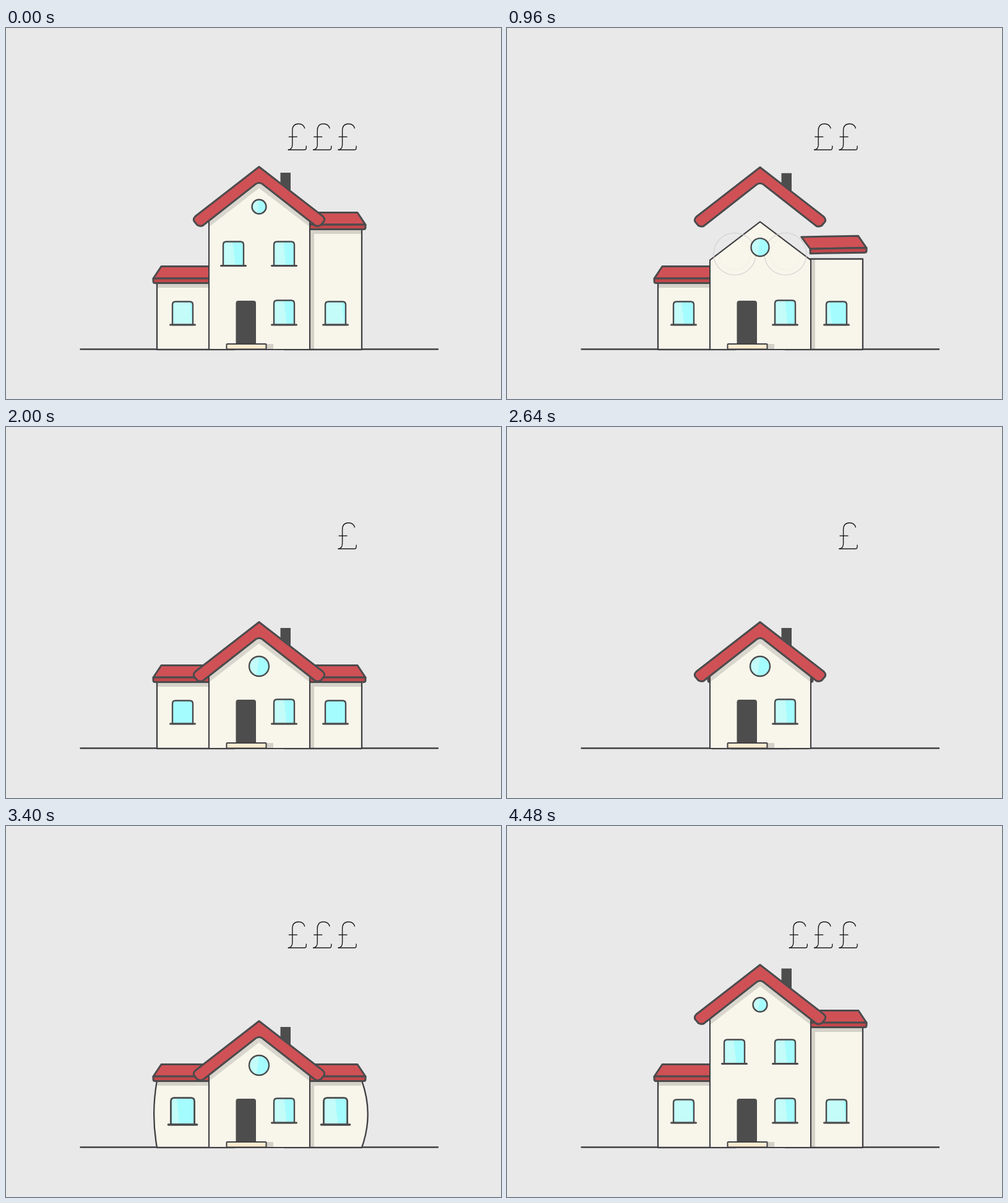
An HTML page that plays this animation: 800 by 600 pixels, repeating every 4.56 s.

```html
<!DOCTYPE html>
<html lang="en">
<head>
<meta charset="utf-8">
<title>House resizing</title>
<style>
  html, body { margin: 0; width: 100%; height: 100%; overflow: hidden; background: #e9e9e9; }
  svg { display: block; width: 800px; height: 600px; stroke-linejoin: round; }
</style>
</head>
<body>
<svg id="stage" viewBox="0 0 800 600"></svg>
<script>
const LOOP = 4560, STEP = 40;
const INK = '#4b4b4d', LINE = '#3f3f43', WALL = '#f8f6eb', SHADE = '#d3d1c8';
const RED = '#cf5155', DARK_RED = '#c2474b', GLASS = '#a5fcff', SHINE = '#c3fcf8';
const stage = document.getElementById('stage');

const clamp = (v, lo, hi) => Math.max(lo, Math.min(hi, v));
const part = (t, start, span) => clamp((t - start) / span, 0, 1);
const smooth = u => u * u * (3 - 2 * u);
// Pulls back by the amount s before it leaves.
const backIn = (u, s) => u * u * ((s + 1) * u - s);

// Window standing on its sill at (x, y); edge is where the shine ends.
function pane(x, y, h, edge, scale = 1) {
  if (scale <= 0) return '';
  const frame = `M-16.5 0V${5 - h}q0-5 5-5H11.5q5 0 5 5V0Z`;
  const a = clamp(edge - 2, -15, 15), b = clamp(edge + 2, -15, 15);
  return `<g transform="translate(${x} ${y - h / 2}) scale(${scale}) translate(0 ${h / 2})">
    <path d="${frame}" fill="${GLASS}"/>
    <path d="M-15 0V${5 - h}q0-4 4-4H${a}L${b} 0Z" fill="${SHINE}" opacity="${edge > -13 ? 1 : 0}"/>
    <path d="${frame}" fill="none" stroke="${INK}" stroke-width="2.4"/>
    <path d="M-20 0H20" stroke="${INK}" stroke-width="3" stroke-linecap="round"/></g>`;
}

// Left-hand wing; the right one is its mirror image.
function wing(slide, wallY, roofY, tilt, bulge, side) {
  const top = 412 + wallY, more = Math.max(0, -slide);
  const shade = Math.max(0, 8 - wallY + roofY);
  const outline = `M370 520H244Q${244 - bulge} ${(top + 520) / 2} 244 ${top}H370`;
  return `<g transform="translate(${slide} 0)">
    <path d="${outline}" fill="${WALL}"/>
    <path d="M245 ${top}H370v${shade}H245Z${side ? `M321 ${top + shade}H370V519H321Z` : ''}" fill="${SHADE}"/>
    <path d="${outline}" fill="none" stroke="${LINE}" stroke-width="2.3"/>
    <g transform="translate(0 ${roofY}) rotate(${tilt} 290 405)" stroke="${INK}" stroke-width="3">
      <path d="M251 385.5H${343 + more}L${329 + more} 405H238Z" fill="${RED}"/>
      <path d="M238 405H${329 + more}V412.5H241q-3 0-3-3Z" fill="${DARK_RED}"/>
    </g></g>`;
}

function pound(x, drawn) {
  if (drawn <= 0) return '';
  const strokes = ['M28 162q-2-7.5-10-7.5q-10 0-10 11V188q0 8-7 8.5', 'M2 175.5H16', 'M1 196.5H28q3 0 2.5-6.5'];
  return `<g transform="translate(${x} .5)" fill="none" stroke="#1c1c1c" stroke-width="1.4">` +
    strokes.map(d => `<path pathLength="1" stroke-dasharray="${drawn} 2" d="${d}"/>`).join('') + '</g>';
}

// Burst left behind by a vanishing window.
function ring(x, u) {
  if (u <= 0 || u >= 1) return '';
  const r = 42 * (1 - (1 - u) ** 2.4);
  return `<g fill="none" stroke="#cfcfcf" opacity="${1 - u * u}">
    <circle cx="${x}" cy="365.5" r="${r}" stroke-width="1.5"/>
    <circle cx="${x}" cy="365.5" r="${r * .75}" stroke-width=".5" opacity=".5"/></g>`;
}

function draw(t) {
  // 0 at rest, 1 between the trip out and the trip back.
  const away = (out, outSpan, back, backSpan) =>
    smooth(part(t, out, outSpan)) - smooth(part(t, back, backSpan));
  const hop = (start, span, height) => height * Math.sin(Math.PI * part(t, start, span));
  const shine = time => 20 * Math.cos(2 * Math.PI * time / LOOP) - 6;

  const wall = 92 * away(780, 250, 3580, 200);
  const roof = 91 * away(900, 240, 3580, 200) - hop(600, 410, 36) - hop(3755, 210, 48);
  const tilt = hop(3700, 360, 8.5);
  const chimney = -hop(4240, 320, 5);
  const eye = away(800, 260, 3580, 200);
  const eyeY = 289 + 98 * eye - hop(3640, 360, 2);

  const slide = 87 * (backIn(part(t, 2040, 460), 1.7) - 1 + backIn(1 - part(t, 2860, 480), 2.5));
  const bulge = hop(2040, 260, 6) + hop(3280, 280, 10);
  const sideWall = 87 * away(820, 260, 3580, 200) - 87;
  const sideRoof = 87 * away(840, 260, 3580, 200) - 87;
  const sideTilt = hop(800, 320, 1) + hop(3700, 300, 2);
  const sideScale = 1 + bulge * .016;

  const upper = 1 - away(780, 120, 3640, 120);
  const upperY = 384.5 - hop(3640, 360, 4.5);
  const burst = part(t, 840, 240);
  const shade = .13 * clamp(1 - (wall - roof) / 60, 0, 1);
  const eave = 301 + wall;

  stage.innerHTML = `
    <defs><linearGradient id="shine" gradientTransform="rotate(8)">
      <stop offset=".5" stop-color="${SHINE}"/><stop offset=".5" stop-color="${GLASS}"/></linearGradient></defs>
    <path d="M119.5 519.5H699" stroke="${LINE}" stroke-width="2.6"/>
    ${wing(slide, 0, 0, 0, bulge, false)}
    <g transform="translate(819 0) scale(-1 1)">${wing(slide, sideWall, sideRoof, sideTilt, bulge * 2, true)}</g>
    ${pane(285.5 + slide, 480, 37.5, shine(t), sideScale)}
    ${pane(532.5 - slide, 480, 37.5, shine(t + 300), sideScale)}
    <path d="M328 ${eave}L409 ${eave - 62}L491 ${eave}V520H328Z" fill="${WALL}" stroke="${LINE}" stroke-width="2.1"/>
    ${ring(368, burst)}${ring(450, burst)}
    ${pane(367.5, upperY, 39, 1, upper)}
    ${pane(449.5, upperY, 39, 1, upper)}
    ${pane(449.5, 480, 39.5, 2)}
    <circle cx="409" cy="${eyeY}" r="${11.5 + 4.5 * eye}" fill="url(#shine)" stroke="${INK}" stroke-width="2.4"/>
    <path d="M421 511H432V519H421Z" fill="${SHADE}"/>
    <path d="M371.5 511V445q0-4 4-4H400q4 0 4 4V511Z" fill="#4d4d4d"/>
    <rect x="356.5" y="511" width="64" height="8.5" rx="1" fill="#fdebd0" stroke="${LINE}" stroke-width="2"/>
    <g transform="translate(0 ${roof}) rotate(${tilt} 409 270)">
      <path d="M409 250L329 312V321L409 259L490 321V312Z" opacity="${shade}"/>
      <rect x="443.5" y="${234 + chimney}" width="16.5" height="34" fill="#4d4d4d"/>
      <path d="M409 224.5L306 304.5q-4 4-2 8l5 6q4 3 9 1L404 252q5-3 10 0L500 319.5q5 2 9-1l5-6q2-4-2-8Z"
        fill="${RED}" stroke="${INK}" stroke-width="3"/>
    </g>
    <g role="img" aria-label="£££">
      ${pound(454.8, 1 - away(200, 280, 3040, 280))}
      ${pound(495.2, 1 - away(1740, 220, 2700, 300))}
      ${pound(535.6, 1)}
    </g>`;
}

function tick() {
  draw(Math.floor(performance.now() % LOOP / STEP) * STEP);
  requestAnimationFrame(tick);
}
tick();
</script>
</body>
</html>
```
